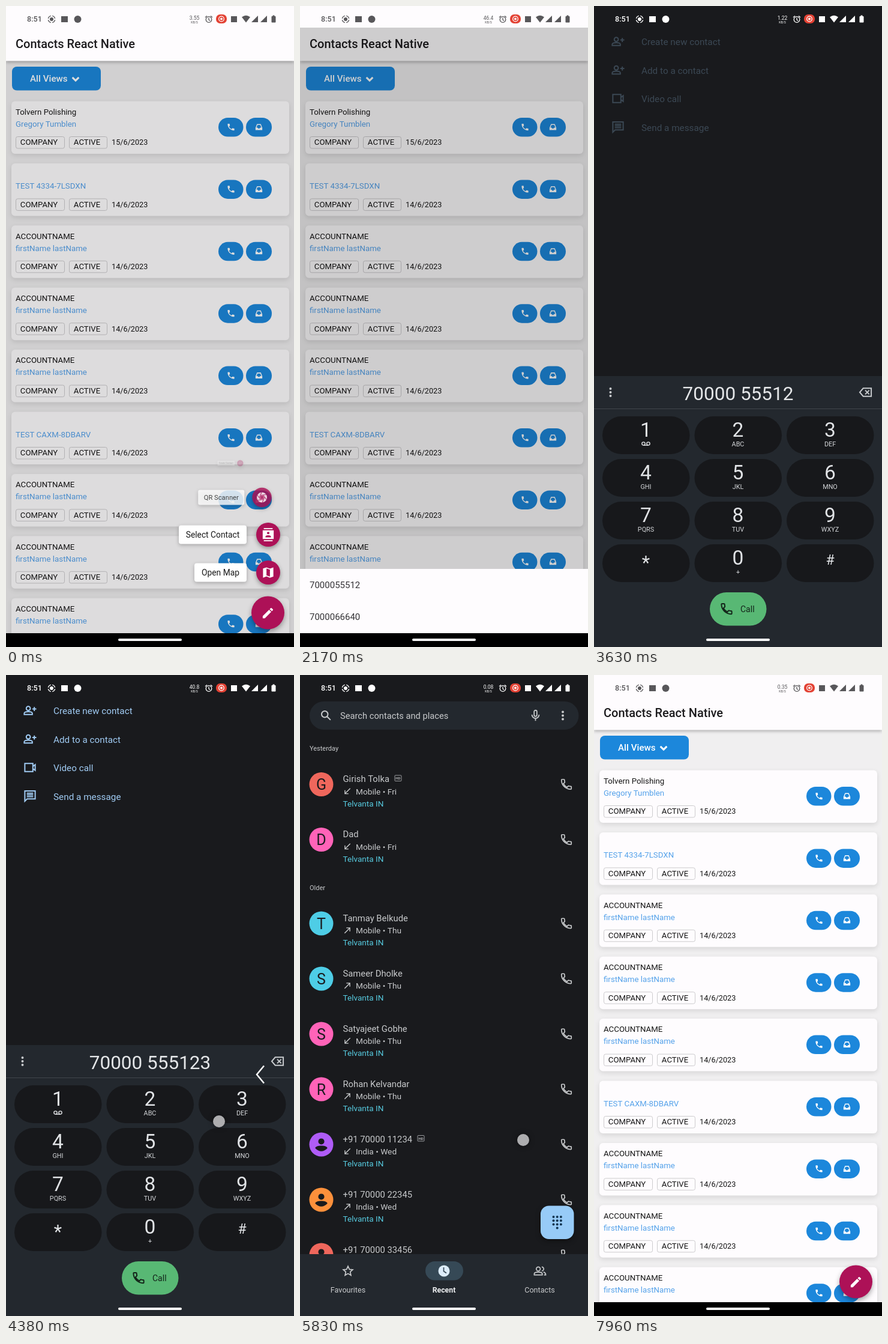
Recreate the animation shown at these times as an HTML page with a canvas. Size 480 by 1067 pixels, loop 8 s.

```html
<!DOCTYPE html>
<html lang="en">
<head>
<meta charset="utf-8">
<title>Contacts and dialer</title>
<style>
html, body { margin: 0; width: 480px; height: 1067px; overflow: hidden; background: #000; }
canvas { display: block; }
</style>
</head>
<body>
<canvas id="stage" width="480" height="1067"></canvas>
<script>
const ctx = document.getElementById('stage').getContext('2d');
const LOOP = 8000;
const BLUE = '#1c87db', PINK = '#ad1157', WHITE = '#fefcfe';
const DARK = '#191a1d', PANEL = '#23282e', PALE = '#c8cacc', SKY = '#a0cbf3';
const NUMBER = '70000 55512';

const ICONS = {
  phone: 'M6.6 10.8c1.4 2.8 3.8 5.1 6.6 6.6l2.2-2.2c.3-.3.7-.4 1-.2 1.1.4 2.3.6 3.6.6.6 0 1 .4 1 1V20c0 .6-.4 1-1 1-9.4 0-17-7.6-17-17 0-.6.4-1 1-1h3.5c.6 0 1 .4 1 1 0 1.3.2 2.5.6 3.6.1.4 0 .7-.3 1z',
  inbox: 'M7 4h10l4 10v6H3v-6zM8.300 6.500L5.500 13.500H9l1.500 2.500h3L15 13.500h3.500L15.700 6.500z',
  pencil: 'M3 17.300V21h3.700L17.800 9.900l-3.700-3.700zM20.700 7c.4-.4.4-1 0-1.400l-2.300-2.300c-.4-.4-1-.4-1.400 0l-1.900 1.800 3.700 3.700z',
  map: 'M21 3L15 5.100 9 3 3 5V21L9 18.900l6 2.100 6-2zM15 19l-6-2.100V5l6 2.100z',
  card: 'M4 0h16v2H4zM4 22h16v2H4zM2 4h20v16H2zM12 6.700a2.300 2.300 0 1 0 0 4.600 2.300 2.300 0 0 0 0-4.600zM17 17v-1.500c0-3.300-10-3.300-10 0V17z',
  person: 'M12 3a4.500 4.500 0 1 0 0 9 4.500 4.500 0 0 0 0-9zM3 17.500c0-5 18-5 18 0q-9 9-18 0z',
  addPerson: 'M9 5a3.500 3.500 0 1 0 0 7 3.500 3.500 0 0 0 0-7zM2 19v-2c0-4 14-4 14 0v2zM19.500 6v7M16 9.500h7',
  people: 'M9 5a3.500 3.500 0 1 0 0 7 3.500 3.500 0 0 0 0-7zM2 19v-2c0-4 14-4 14 0v2zM15 5a3.500 3.500 0 0 1 0 7M18 14q4 1 4 5h-3',
  video: 'M3 5h14v14H3zM17 10l4-3v10l-4-3',
  message: 'M3 21V3h18v14H7zM6.500 7h11M6.500 10h11M6.500 13h11',
  search: 'M10 4a6 6 0 1 0 0 12 6 6 0 0 0 0-12zM14.500 14.500L21 21',
  mic: 'M12 3a2.500 2.500 0 0 0-2.500 2.500v6a2.500 2.500 0 0 0 5 0v-6A2.500 2.500 0 0 0 12 3zM5.500 11a6.500 6.500 0 0 0 13 0M12 17.500V22',
  erase: 'M8 5h14v14H8l-6-7zM11.500 8.500l7 7M18.500 8.500l-7 7',
  star: 'M12 3l2.700 6 6.300.6-4.800 4.300 1.400 6.400L12 17l-5.600 3.300 1.400-6.400L3 9.600 9.300 9z',
  incoming: 'M20 4L5 19M5 9v10h10',
  outgoing: 'M4 20L19 5M9 5h10v10',
  chevron: 'M4 8l8 8 8-8'
};
for (const key in ICONS) ICONS[key] = new Path2D(ICONS[key]);

const clamp = v => Math.max(0, Math.min(1, v));
const ramp = (t, start, length) => clamp((t - start) / length);
const easeOut = u => 1 - (1 - u) ** 2;
const easeInOut = u => u < .5 ? 2 * u * u : 1 - 2 * (1 - u) ** 2;
const mix = (a, b, u) => a + (b - a) * u;

function rect(x, y, w, h, color) {
  ctx.fillStyle = color;
  ctx.fillRect(x, y, w, h);
}
function round(x, y, w, h, r, fill, stroke) {
  ctx.beginPath();
  ctx.roundRect(x, y, w, h, r);
  if (fill) { ctx.fillStyle = fill; ctx.fill(); }
  if (stroke) { ctx.strokeStyle = stroke; ctx.lineWidth = 1; ctx.stroke(); }
}
function circle(x, y, r, color) {
  ctx.beginPath();
  ctx.arc(x, y, r, 0, 7);
  ctx.fillStyle = color;
  ctx.fill();
}
function poly(points, color) {
  ctx.beginPath();
  points.forEach(p => ctx.lineTo(...p));
  ctx.fillStyle = color;
  ctx.fill();
}
// The y given is the middle of the capitals.
function text(s, x, y, size, color, align = 'left', weight = 400) {
  ctx.font = `${weight} ${size}px Roboto, sans-serif`;
  ctx.textAlign = align;
  ctx.fillStyle = color;
  ctx.fillText(s, x, y + size * .355);
}
function icon(name, x, y, size, color, line = 0) {
  ctx.save();
  ctx.translate(x - size / 2, y - size / 2);
  ctx.scale(size / 24, size / 24);
  if (line) {
    ctx.strokeStyle = color;
    ctx.lineWidth = line * 24 / size;
    ctx.stroke(ICONS[name]);
  } else {
    ctx.fillStyle = color;
    ctx.fill(ICONS[name], 'evenodd');
  }
  ctx.restore();
}
function shadowed(blur, dy, alpha, draw) {
  ctx.save();
  ctx.shadowColor = `rgba(0,0,0,${alpha})`;
  ctx.shadowBlur = blur;
  ctx.shadowOffsetY = dy;
  draw();
  ctx.restore();
}
function faded(alpha, draw) {
  if (alpha <= 0) return;
  ctx.save();
  ctx.globalAlpha *= alpha;
  draw();
  ctx.restore();
}
function dots(x, y, color) {
  for (let i = -1; i < 2; i++) circle(x, y + i * 6, 2, color);
}

function speed(t) {
  const steps = [[7000, '0.35'], [5300, '0.08'], [3900, '40.8'], [2900, '1.22'], [1650, '46.4'], [0, '3.55']];
  return steps.find(s => t >= s[0])[1];
}

function statusBar(t, color) {
  text('8:51', 35, 22, 12.6, color, 'left', 500);
  circle(76, 22, 3, color);
  ctx.strokeStyle = color;
  ctx.lineWidth = 1.4;
  for (let i = 0; i < 4; i++) {
    ctx.beginPath();
    ctx.arc(76, 22, 5.7, i * Math.PI / 2 + .2, i * Math.PI / 2 + 1.37);
    ctx.stroke();
  }
  rect(92, 17, 11, 10, color);
  circle(119.500, 22, 6, color);
  text(speed(t), 314, 19.500, 8.500, color, 'center');
  text('KB/S', 314, 27, 5, color, 'center');

  ctx.lineWidth = 1.3;
  ctx.beginPath();
  ctx.arc(338, 22.500, 4.800, 0, 7);
  ctx.moveTo(338, 19.500); ctx.lineTo(338, 23); ctx.lineTo(340, 24.500);
  ctx.moveTo(332, 19); ctx.lineTo(335, 16.500);
  ctx.moveTo(344, 19); ctx.lineTo(341, 16.500);
  ctx.stroke();

  round(350, 14, 18, 15, 7, '#e34234');
  circle(359, 21.500, 2, '#fff');
  ctx.strokeStyle = '#fff';
  ctx.beginPath();
  ctx.arc(359, 21.500, 4.300, 0, 7);
  ctx.stroke();

  rect(375, 17, 10, 10, color);
  ctx.beginPath();
  ctx.moveTo(400, 27.500); ctx.lineTo(393, 18.500);
  ctx.quadraticCurveTo(400, 13, 407, 18.500);
  ctx.fillStyle = color;
  ctx.fill();
  for (const x of [409, 424]) poly([[x, 27], [x + 11, 16], [x + 11, 27]], color);
  round(442.500, 17, 7, 10.500, 1, color);
  rect(444.500, 15.500, 3, 2, color);
}

function navPill() {
  round(187, 1053, 106, 4, 2, '#fff');
}

const CONTACTS = [['Tolvern Polishing', 'Gregory Tumblen', '15/6/2023'], ['', 'TEST 4334-7LSDXN'], [], [], [],
  ['', 'TEST CAXM-8DBARV'], [], [], []];

function contactCard(i, pressed) {
  const [account = 'ACCOUNTNAME', link = 'firstName lastName', date = '14/6/2023'] = CONTACTS[i];
  const y = 158.500 + i * 103.400;
  shadowed(8, 3, .11, () => round(9, y, 463, 87.500, 6, WHITE));
  text(account, 16, y + 17.500, 13.300, '#151515');
  text(link, 16, y + 37.500, 13.300, '#55a2ea');
  round(16.500, y + 59, 81, 19.500, 3, null, '#cccbcd');
  round(105.500, y + 59, 63, 19.500, 3, null, '#cccbcd');
  text('COMPANY', 55, y + 68.300, 13.200, '#151515', 'center');
  text('ACTIVE', 135, y + 68.300, 13.200, '#151515', 'center');
  text(date, 176, y + 68.300, 12.700, '#151515');
  round(354, y + 27.500, 41.500, 31.500, 15.700, BLUE);
  if (pressed) faded(pressed, () => round(354, y + 27.500, 41.500, 31.500, 15.700, 'rgba(255,255,255,.17)'));
  round(400, y + 27.500, 43, 31.500, 15.700, BLUE);
  icon('phone', 375, y + 43, 15, '#fff');
  icon('inbox', 421.500, y + 43, 15, '#fff');
}

function aperture(x, y, r) {
  circle(x, y, r, '#fff');
  ctx.strokeStyle = PINK;
  ctx.lineWidth = 1.400;
  for (let i = 0; i < 6; i++) {
    const a = i * Math.PI / 3, b = a + 1.500;
    ctx.beginPath();
    ctx.moveTo(x + Math.cos(a) * r * .48, y + Math.sin(a) * r * .48);
    ctx.lineTo(x + Math.cos(b) * r, y + Math.sin(b) * r);
    ctx.stroke();
  }
  circle(x, y, r * .35, PINK);
}

const ACTIONS = [
  ['Create Contact', 'addPerson', 291, 761, -95],
  ['QR Scanner', 'aperture', 306, 818, -45],
  ['Select Contact', 'card', 288, 880, 5],
  ['Open Map', 'map', 314, 943, 55]
];

function speedDial(t) {
  for (const [label, glyph, left, y, start] of ACTIONS) {
    const scale = 1 - easeInOut(ramp(t, start, 150));
    if (scale <= 0) continue;
    const mid = (left + 457) / 2;
    faded(scale, () => {
      ctx.translate(mid, y);
      ctx.scale(scale, scale);
      ctx.translate(-mid, -y);
      shadowed(6, 2, .25, () => round(left, y - 15.500, 401 - left, 31, 4, '#fff'));
      text(label, (left + 401) / 2, y, 13.800, '#1b1b1b', 'center');
      shadowed(7, 3, .35, () => circle(437, y, 20, PINK));
      if (glyph === 'aperture') aperture(437, y, 10.500);
      else icon(glyph, 437, y, glyph === 'card' ? 22 : 23, '#fff', glyph === 'addPerson' ? 2 : 0);
    });
  }
}

function contactsApp(t) {
  rect(0, 0, 480, 1067, '#f0eff0');
  shadowed(5, 2, .25, () => rect(0, 0, 480, 91.500, WHITE));
  text('Contacts React Native', 16, 63, 20, '#1c1b1d', 'left', 500);
  round(10, 101, 148, 39.500, 8, BLUE);
  text('All Views', 40, 121, 15.200, '#fff', 'left', 500);
  icon('chevron', 116, 121.500, 16, '#fff', 3);

  const pressed = ramp(t, 1010, 60) * (1 - ramp(t, 1130, 150));
  CONTACTS.forEach((_, i) => contactCard(i, i ? 0 : pressed));

  const menuDim = .13 * (1 - easeInOut(ramp(t, 0, 200)));
  if (t < 200) rect(0, 91.500, 480, 953, `rgba(0,0,0,${menuDim})`);
  speedDial(t);
  shadowed(8, 4, .35, () => circle(436.500, 1010, 27.500, PINK));
  icon('pencil', 436.500, 1010.500, 23, '#fff');

  const sheet = easeOut(ramp(t, 1250, 300)) * (1 - easeInOut(ramp(t, 2630, 250)));
  if (sheet > 0) {
    rect(0, 36, 480, 1008, `rgba(0,0,0,${.19 * sheet})`);
    const y = mix(1044, 937, sheet);
    rect(0, y, 480, 107, WHITE);
    text('7000055512', 16, y + 27, 15, '#343336');
    text('7000066640', 16, y + 80, 15, '#343336');
  }
  rect(0, 0, 480, 36, WHITE);
  statusBar(t, '#58575a');
  rect(0, 1044, 480, 23, '#000');
  navPill();
}

const KEYS = [['1', ''], ['2', 'ABC'], ['3', 'DEF'], ['4', 'GHI'], ['5', 'JKL'], ['6', 'MNO'],
  ['7', 'PQRS'], ['8', 'TUV'], ['9', 'WXYZ'], ['*', ''], ['0', '+'], ['#', '']];

function voicemail(x, y) {
  ctx.strokeStyle = '#e1e3e6';
  ctx.lineWidth = 1.400;
  for (const dx of [-4, 4]) {
    ctx.beginPath();
    ctx.arc(x + dx, y, 2.600, 0, 7);
    ctx.stroke();
  }
  rect(x - 4, y + 2, 8, 1.400, '#e1e3e6');
}

function dialpad(t, y) {
  rect(0, y, 480, 1067, PANEL);
  dots(27.500, y + 27, '#c7cacd');
  text(t > 4240 ? NUMBER + '3' : NUMBER, 240, y + 28.500, 31.500, '#e4e6e8', 'center');
  icon('erase', 452.500, y + 27, 23, '#c7cacd', 2);
  rect(0, y + 54, 480, 1, '#41464c');
  KEYS.forEach(([digit, letters], i) => {
    const x = 14 + (i % 3) * 153.500, top = y + 67 + Math.floor(i / 3) * 71, mid = x + 72.500;
    round(x, top, 145.500, 63, 31.500, '#17181b');
    if (digit === '*') text(digit, mid, top + 30, 31, '#e1e3e6', 'center');
    else if (digit === '#') text(digit, mid, top + 26, 23, '#e1e3e6', 'center');
    else text(digit, mid, top + 22, 33.500, '#e1e3e6', 'center');
    if (digit === '1') voicemail(mid, top + 45.500);
    text(letters, mid, top + 46.500, 10.800, '#d5d7da', 'center');
  });
  round(193, y + 360, 94.500, 55.500, 27.700, '#58b874');
  icon('phone', 221, y + 387.500, 23, '#14251a', 2);
  text('Call', 244, y + 388.500, 14, '#14251a');
}

const OPTIONS = [['addPerson', 'Create new contact'], ['addPerson', 'Add to a contact'],
  ['video', 'Video call'], ['message', 'Send a message']];

function dialOptions() {
  OPTIONS.forEach(([glyph, label], i) => {
    const y = 60 + i * 47.500;
    icon(glyph, 40, y - 1, 23, SKY, 2);
    text(label, 79, y, 15.300, SKY);
  });
}

const CALLS = [
  ['Girish Tolka', 182, '#ef675c', 'incoming', 'Mobile • Fri', true],
  ['Dad', 274, '#ff63b8', 'incoming', 'Mobile • Fri'],
  ['Tanmay Belkude', 413.500, '#4ecde6', 'outgoing', 'Mobile • Thu'],
  ['Sameer Dholke', 505.500, '#4ecde6', 'outgoing', 'Mobile • Thu'],
  ['Satyajeet Gobhe', 597.500, '#ff63b8', 'incoming', 'Mobile • Thu'],
  ['Rohan Kelvandar', 689.500, '#ff63b8', 'outgoing', 'Mobile • Thu'],
  ['+91 70000 11234', 781.500, '#af5cf7', 'incoming', 'India • Wed', true],
  ['+91 70000 22345', 873.500, '#fc903b', 'outgoing', 'India • Wed'],
  ['+91 70000 33456', 965.500, '#ef675c', 'outgoing', 'India • Wed']
];

function callRow([name, y, color, arrow, detail, hd]) {
  circle(35.500, y, 20, color);
  if (name[0] === '+') icon('person', 35.500, y, 27, DARK);
  else text(name[0], 35.500, y + .5, 25, DARK, 'center');
  text(name, 71.500, y - 9, 14.800, PALE);
  if (hd) {
    const x = 71.500 + ctx.measureText(name).width + 9;
    round(x, y - 15, 11, 9.500, 1, null, '#9a9c9f');
    text('HD', x + 5.500, y - 10, 6, '#b0b2b4', 'center', 700);
  }
  icon(arrow, 79, y + 11.500, 14, PALE, 1.400);
  text(detail, 93, y + 12, 13.700, PALE);
  text('Telvanta IN', 71.500, y + 32, 13.600, '#57cbe0');
  icon('phone', 444, y, 22, PALE, 1.700);
}

function recents() {
  round(16, 44, 448.500, 47, 23.500, PANEL);
  icon('search', 43, 67, 21, PALE, 2);
  text('Search contacts and places', 67, 68, 14.700, PALE);
  icon('mic', 392.500, 67, 22, PALE, 1.800);
  dots(438, 67.500, PALE);
  text('Yesterday', 16, 122, 11, PALE);
  text('Older', 16, 354, 11, PALE);
  CALLS.forEach(callRow);

  shadowed(8, 3, .4, () => round(401, 883.500, 55.500, 55.500, 14, '#97cbf7'));
  for (let i = 0; i < 10; i++) {
    const column = i === 9 ? 1 : i % 3;
    circle(422.500 + column * 6.200, 902 + Math.floor(i / 3) * 6.200, 2, '#123450');
  }

  rect(0, 964, 480, 103, PANEL);
  round(209, 976, 63, 31.500, 15.700, '#364956');
  icon('star', 80, 992, 21, PALE, 1.700);
  circle(240, 992, 9.500, '#dcecfb');
  ctx.strokeStyle = '#364956';
  ctx.lineWidth = 1.700;
  ctx.beginPath();
  ctx.moveTo(239.500, 986); ctx.lineTo(239.500, 992.500); ctx.lineTo(244, 995.500);
  ctx.stroke();
  icon('people', 400, 992, 23, PALE, 1.700);
  text('Favourites', 80, 1023.500, 12.600, PALE, 'center');
  text('Recent', 240, 1023.500, 12.300, '#eef0f2', 'center', 700);
  text('Contacts', 399.500, 1023.500, 12.600, PALE, 'center');
}

function dialerApp(t) {
  rect(0, 0, 480, 1067, DARK);
  faded(ramp(t, 3600, 120) * (1 - ramp(t, 4470, 80)), dialOptions);
  faded(ramp(t, 4500, 130), recents);
  const padY = t < 4450
    ? mix(1067, 616, easeOut(ramp(t, 3330, 240)))
    : mix(616, 1067, easeInOut(ramp(t, 4450, 250)));
  if (padY < 1067) dialpad(t, padY);
  if (t > 3330) rect(0, 1043.500, 480, 24, PANEL);
  statusBar(t, '#fff');
  navPill();
}

function touch(x, y, alpha, fill = '#adadaf') {
  faded(alpha, () => shadowed(9, 0, .5, () => circle(x, y, 10, fill)));
}

function backArrow(y, pull) {
  faded(pull, () => {
    const x = mix(478, 418, pull);
    ctx.strokeStyle = '#fff';
    ctx.lineWidth = 2.500;
    ctx.beginPath();
    ctx.moveTo(x + 12, y - 14.500); ctx.lineTo(x, y); ctx.lineTo(x + 12, y + 14.500);
    ctx.stroke();
  });
}

function touches(t) {
  const tap = (start, end) => ramp(t, start, 40) * (1 - ramp(t, end, 60));
  faded(tap(1000, 1120), () => {
    circle(375, 201.500, 11, 'rgba(255,255,255,.3)');
    circle(375, 201.500, 8, 'rgba(255,255,255,.25)');
  });
  touch(58, 963, tap(2450, 2560) * .6);
  const first = easeOut(ramp(t, 4240, 140));
  touch(mix(474, 355, first), mix(725, 743, first), tap(4220, 4410));
  if (t < 4430) backArrow(665, first);
  const second = easeOut(ramp(t, 5680, 140));
  touch(mix(474, 372, second), mix(768, 774, second), tap(5660, 5840));
  if (t < 5820) backArrow(695, second);
}

function draw(t) {
  const open = easeOut(ramp(t, 2900, 180)), close = ramp(t, 5870, 90);
  if (open < 1 || close > 0) contactsApp(t);
  faded(open * (1 - close), () => {
    ctx.translate(0, (1 - open) * 60);
    dialerApp(t);
  });
  touches(t);
}

function frame(now) {
  draw(now % LOOP);
  requestAnimationFrame(frame);
}
requestAnimationFrame(frame);
</script>
</body>
</html>
```
